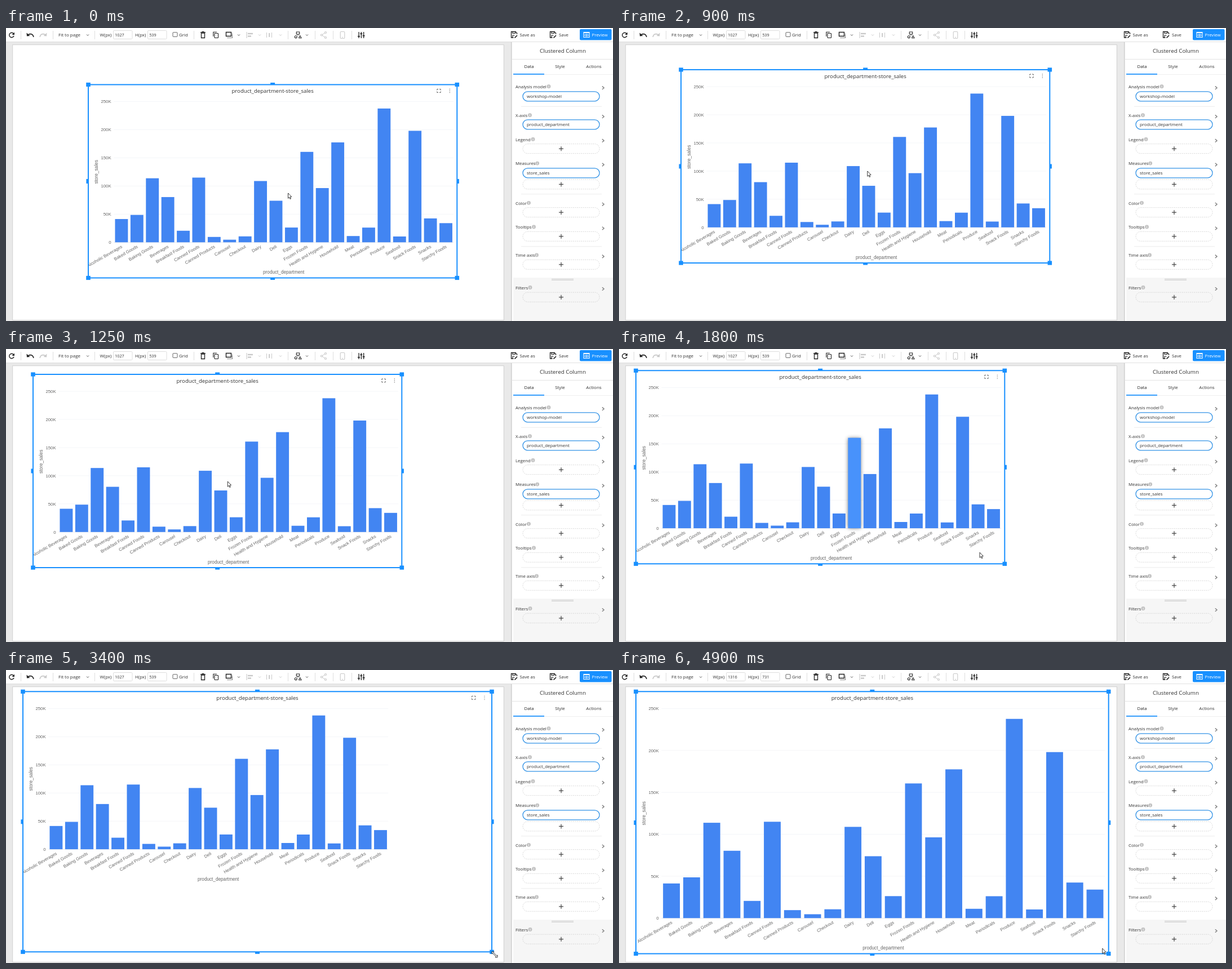
Write an HTML page with a canvas that moves like this. It is 1077x520 px and loops after 5 s.

```html
<!DOCTYPE html>
<html lang="en">
<head>
<meta charset="utf-8">
<title>Resizing a chart</title>
<style>
  html, body { margin: 0; width: 100%; height: 100%; overflow: hidden; background: #e9e9e9; }
  canvas { display: block; width: 1077px; height: 520px; }
</style>
</head>
<body>
<canvas id="stage" width="1077" height="520"></canvas>
<script>
const LOOP = 5000, STEP = 50;
const W = 1077, H = 520;
const BLUE = '#1890ff', INK = '#222', PALE = '#c9c9c9';
const UI = '"Open Sans", "Noto Sans", sans-serif';
const PLOT = '"Liberation Sans", Arial, sans-serif';
const ctx = document.getElementById('stage').getContext('2d');

const data = [
  ['Alcoholic Beverages', 41.3], ['Baked Goods', 48.6], ['Baking Goods', 113.7],
  ['Beverages', 80.3], ['Breakfast Foods', 20.5], ['Canned Foods', 114.9],
  ['Canned Products', 9.5], ['Carousel', 4.6], ['Checkout', 10.5], ['Dairy', 108.8],
  ['Deli', 73.8], ['Eggs', 26.2], ['Frozen Foods', 160.6], ['Health and Hygiene', 96.3],
  ['Household', 177.4], ['Meat', 11.1], ['Periodicals', 26.1], ['Produce', 237.6],
  ['Seafood', 10.3], ['Snack Foods', 198], ['Snacks', 42.4], ['Starchy Foods', 34]
];

// Tracks hold [time, x, y]
const corner = [
  [600, 146, 100.5], [750, 133, 91], [900, 110, 74], [1100, 72, 55],
  [1250, 48, 45], [1400, 34, 39.5], [1500, 30, 38.3]
];
const size = [
  [2750, 654.3, 343], [2850, 657.3, 346.3], [3000, 730, 398], [3200, 800, 446],
  [3400, 832, 462], [3700, 838.7, 465.2]
];
const pointer = [
  [550, 500.5, 293], [650, 495, 290], [750, 476, 277], [900, 440.8, 254],
  [1100, 411, 243], [1250, 393.3, 235], [1400, 386, 231], [1600, 385, 231],
  [1700, 422, 250], [1800, 640, 361], [1850, 640, 361], [1950, 681, 380],
  [2200, 685, 383], [2300, 686, 388], [2400, 685, 383], [2700, 685, 383],
  [2850, 767, 452.5], [3000, 828, 490], [3200, 860, 505], [3350, 867, 505],
  [3800, 867, 504], [3950, 864, 500], [4050, 862.7, 498], [4250, 862.7, 498],
  [4400, 857.7, 494]
];

function sample(track, t) {
  if (t <= track[0][0]) return track[0].slice(1);
  for (let i = 1; i < track.length; i++) {
    const [t1, x1, y1] = track[i], [t0, x0, y0] = track[i - 1];
    if (t <= t1) {
      const k = (t - t0) / (t1 - t0);
      return [x0 + (x1 - x0) * k, y0 + (y1 - y0) * k];
    }
  }
  return track[track.length - 1].slice(1);
}

function text(s, x, y, px, color = '#333', align = 'left', family = UI) {
  ctx.font = px + 'px ' + family;
  ctx.fillStyle = color;
  ctx.textAlign = align;
  ctx.textBaseline = 'alphabetic';
  ctx.fillText(s, x, y + px * 0.35);
}

function box(x, y, w, h, color) {
  ctx.fillStyle = color;
  ctx.fillRect(x, y, w, h);
}

function line(points, color = INK, width = 1) {
  ctx.beginPath();
  for (let i = 0; i < points.length; i += 2) ctx.lineTo(points[i], points[i + 1]);
  ctx.strokeStyle = color;
  ctx.lineWidth = width;
  ctx.stroke();
}

function frame(x, y, w, h, color = INK, width = 1, r = 0) {
  ctx.beginPath();
  ctx.roundRect(x, y, w, h, r);
  ctx.strokeStyle = color;
  ctx.lineWidth = width;
  ctx.stroke();
}

function dot(x, y, r, color) {
  ctx.beginPath();
  ctx.arc(x, y, r, 0, 7);
  ctx.fillStyle = color;
  ctx.fill();
}

function poly(points, fill) {
  ctx.beginPath();
  for (let i = 0; i < points.length; i += 2) ctx.lineTo(points[i], points[i + 1]);
  ctx.closePath();
  ctx.fillStyle = fill;
  ctx.fill();
}

const chevron = (x, y, color = '#555') => line([x - 2, y - 1, x, y + 1, x + 2, y - 1], color, 1);

function curl(x, dir, color) {
  ctx.beginPath();
  ctx.moveTo(x - 4 * dir, 12);
  ctx.quadraticCurveTo(x + 4 * dir, 8, x + 6 * dir, 16);
  ctx.strokeStyle = color;
  ctx.lineWidth = 1.6;
  ctx.stroke();
  poly([x - 6.5 * dir, 8.5, x - 6 * dir, 14.5, x - 0.5 * dir, 14], color);
}

function floppy(x) {
  line([x + 5, 11, x + 5, 9, x + 2.5, 6.5, x - 5, 6.5, x - 5, 17, x - 1, 17], INK, 1.3);
  line([x - 2.5, 6.5, x - 2.5, 9.5, x + 2, 9.5, x + 2, 6.5], INK, 1.1);
  line([x - 2.5, 17, x - 2.5, 13, x + 1, 13], INK, 1.1);
  line([x + 1, 17.5, x + 5.5, 13], INK, 1.7);
}

function toolbar(t) {
  box(0, 0, W, 25, '#fff');
  box(0, 24.3, W, 0.9, '#d4d4d4');
  for (const x of [26, 83, 157, 333, 500, 548, 580, 613]) box(x, 5, 0.8, 15, '#d6d6d6');

  ctx.beginPath();
  ctx.arc(10, 12.5, 4.2, 0.3, 5.5);
  ctx.strokeStyle = INK;
  ctx.lineWidth = 1.4;
  ctx.stroke();
  poly([15, 7.5, 15, 12, 10.5, 12], INK);
  curl(43, 1, INK);
  curl(66, -1, PALE);

  text('Fit to page', 93, 12.5, 8);
  chevron(145, 12.5);
  const grown = t >= 4300;
  const fields = [['W(px)', 166.5, 190, grown ? '1316' : '1027'], ['H(px)', 229, 251, grown ? '731' : '539']];
  for (const [label, x, fx, value] of fields) {
    text(label, x, 12.5, 7.9);
    frame(fx + 0.5, 4.5, 33.5, 15, '#dedede', 1, 1.5);
    text(value, fx + 3.2, 12.5, 7.2);
  }
  frame(296, 7.8, 8, 7.6, '#555', 0.9, 1);
  text('Grid', 307, 12, 7.9);

  frame(346.5, 9, 6, 8.5, INK, 1.3);
  box(345, 7.2, 9, 1.3, INK);
  box(347.5, 6, 4, 1.3, INK);
  frame(370, 9.5, 6.5, 8, INK, 1.1, 0.8);
  line([367.8, 15, 367.8, 7.2, 374, 7.2], INK, 1.1);
  frame(390.5, 7.5, 9, 7, INK, 1.4);
  ctx.setLineDash([1.2, 1.2]);
  line([393, 17.5, 401.5, 17.5, 401.5, 10], INK, 1.2);
  ctx.setLineDash([]);
  chevron(413, 12.5);

  box(426.5, 7, 1.1, 11, PALE);
  box(429, 8.8, 9, 2.4, PALE);
  box(429, 13.4, 6, 2.4, PALE);
  chevron(450, 12.5, PALE);
  box(462, 8, 1, 9, PALE);
  box(466.2, 9, 2, 7, PALE);
  box(471, 8, 1, 9, PALE);
  chevron(487, 12.5, PALE);

  frame(515.3, 7, 5.4, 4, INK, 1.1);
  line([518, 11, 518, 13.5], INK);
  frame(512.3, 13.8, 4, 4, INK, 1.1, 2);
  line([519.3, 17.8, 521.7, 13.6, 524, 17.8, 519.3, 17.8], INK, 1.1);
  chevron(534, 12.5);

  line([567, 8, 560, 12.5, 567, 17], PALE, 1);
  for (const [x, y] of [[567, 8], [560, 12.5], [567, 17]]) {
    dot(x, y, 2.1, PALE);
    dot(x, y, 1, '#fff');
  }
  frame(593.2, 6.5, 7.6, 12, PALE, 1.1, 1.2);
  box(596, 16, 2, 1, PALE);
  for (const [x, y] of [[626, 14], [630.3, 9.5], [634.6, 13]]) {
    box(x - 0.6, 7, 1.3, 11, INK);
    box(x - 2, y, 4, 1.5, INK);
  }

  floppy(901.5);
  text('Save as', 911.5, 12.2, 7.85);
  floppy(970.5);
  text('Save', 981, 12.2, 7.85);
  ctx.beginPath();
  ctx.roundRect(1018, 2, 56.5, 19.5, 2);
  ctx.fillStyle = BLUE;
  ctx.fill();
  frame(1025, 7.5, 10, 9, '#fff', 1.1);
  box(1025, 7, 10, 2, '#fff');
  frame(1027, 11, 6, 3.4, '#fff', 0.9, 1.7);
  dot(1030, 12.7, 0.9, '#fff');
  text('Preview', 1039.5, 12, 7.75, '#fff');
}

const heads = [
  ['Analysis model', 104, 963], ['X-axis', 155, 929.5], ['Legend', 197.7, 935],
  ['Measures', 240.4, 942.7], ['Color', 310.6, 927.5], ['Tooltips', 353.3, 936.5],
  ['Time axis', 403.2, 941.5], ['Filters', 460.8, 930]
];

function sidebar() {
  box(897, 25, W - 897, H - 25, '#fff');
  box(896.3, 25, 1.2, H - 25, '#c6c6c6');
  text('Clustered Column', 988, 40.7, 9.8, '#333', 'center');
  box(898, 55, 179, 0.8, '#dcdcdc');
  text('Data', 928, 68.5, 7.8, '#222', 'center');
  text('Style', 983, 68.5, 7.9, '#333', 'center');
  text('Actions', 1043, 68.5, 8, '#333', 'center');
  box(900, 82.2, 177, 0.7, '#e8e8e8');
  box(900, 81, 55, 1.7, BLUE);
  box(900, 443, 177, 77, '#f6f6f6');
  box(968, 445, 39, 0.8, '#c4c4c4');
  box(968, 447, 39, 0.8, '#c4c4c4');
  for (const y of [138.8, 294.5, 387.5]) box(914, y, 143, 0.7, '#e4e4e4');

  for (const [name, y, ix] of heads) {
    text(name, 904, y + 0.3, 7.85);
    dot(ix, y - 0.3, 3.4, '#c2c2c2');
    box(ix - 0.4, y - 2, 0.9, 0.9, '#fff');
    box(ix - 0.4, y - 0.7, 0.9, 2.4, '#fff');
    line([1057.8, y - 0.6, 1061, y + 2.2, 1057.8, y + 5], '#858585', 1.5);
  }
  for (const [s, y] of [['workshop-model', 121.3], ['product_department', 171.3], ['store_sales', 257.3]]) {
    frame(917, y - 8.5, 136, 17, '#3393e6', 1.3, 8.5);
    text(s, 924, y + 0.3, 7.85);
  }
  for (const y of [214.2, 277.4, 327.2, 369.8, 419.8, 477.7]) {
    ctx.setLineDash([2, 1.5]);
    frame(917, y - 8.5, 136, 17, '#cfcfcf', 0.8, 8.5);
    ctx.setLineDash([]);
    line([981, y, 989, y], '#333', 1.1);
    line([985, y - 4, 985, y + 4], '#333', 1.1);
  }
}

function turned(s, x, y, angle, px, align) {
  ctx.save();
  ctx.translate(x, y);
  ctx.rotate(angle);
  text(s, 0, 0, px, '#666', align, PLOT);
  ctx.restore();
}

function plot(left, top, wide, tall, hot) {
  const x0 = left + 45.2, y0 = top + 30, base = y0 + tall;
  const pitch = wide / data.length, barW = pitch * 0.835;
  for (let v = 0; v <= 250; v += 50) {
    const y = base - tall * v / 250;
    box(x0, y - 0.3, wide, 0.7, v ? '#f0f2f6' : '#dfe2e8');
    text(v ? v + 'K' : '0', left + 40.6, y + 0.2, 7.8, '#666', 'right', PLOT);
  }
  data.forEach(([name, value], i) => {
    const mid = x0 + (i + 0.5) * pitch, h = tall * value / 250;
    if (i === hot) {
      ctx.shadowColor = 'rgba(0,0,0,.55)';
      ctx.shadowBlur = 7;
    }
    box(mid - barW / 2, base - h, barW, h, i === hot ? '#4892fb' : '#4285f2');
    ctx.shadowBlur = 0;
    turned(name, mid + 0.6, base + 6.8, -Math.PI / 6, 7.75, 'right');
  });
  text('product_department', x0 + wide / 2, base + 53.3, 8.2, '#666', 'center', PLOT);
  turned('store_sales', left + 14.5, y0 + tall / 2, -Math.PI / 2, 8.3, 'center');
}

function panel(t) {
  const [x, y] = sample(corner, t), [w, h] = sample(size, t);
  const r = x + w, b = y + h, mx = x + w / 2, my = y + h / 2;
  const relaid = t >= 4350;
  box(x, y, w, h, '#fff');
  ctx.save();
  ctx.beginPath();
  ctx.rect(x, y, w, h);
  ctx.clip();
  plot(x, y, relaid ? 787.2 : 603, relaid ? 372 : 249.8, t >= 1700 && t < 1950 ? 12 : -1);
  ctx.restore();
  text('product_department-store_sales', mx, y + 11.3, 9.6, '#333', 'center');

  if (t < 3900) {
    const ix = r - 32.3, iy = y + 11;
    for (const sx of [-1, 1]) for (const sy of [-1, 1])
      line([ix + sx, iy + 3 * sy, ix + 3.2 * sx, iy + 3 * sy, ix + 3.2 * sx, iy + sy], '#555', 0.9);
    for (const d of [-3, 0, 3]) dot(r - 13, iy + d, 0.65, '#666');
  }

  frame(x, y, w, h, BLUE, 2);
  for (const cx of [x, r]) {
    for (const cy of [y, b]) box(cx - 3.8, cy - 3.6, 7.6, 7.2, BLUE);
    box(cx === x ? cx - 3.6 : cx, my - 4, 3.6, 8, BLUE);
  }
  box(mx - 4, y - 3.5, 8, 3.8, BLUE);
  box(mx - 4, b, 8, 3.5, BLUE);
}

function cursor(t) {
  const [x, y] = sample(pointer, t);
  ctx.save();
  ctx.translate(x, y);
  ctx.lineJoin = 'round';
  if (t >= 1950 && t < 3900) {
    const arrows = [-5, -5, -1, -5, -2.3, -3.7, 3.7, 2.3, 5, 1, 5, 5, 1, 5, 2.3, 3.7, -3.7, -2.3, -5, -1];
    poly(arrows, '#fff');
    line(arrows.concat(-5, -5), '#222', 0.9);
  } else {
    const arrow = [0, 0, 0, 9.3, 2.1, 7.4, 3.6, 10.6, 5, 10, 3.5, 6.9, 6.3, 6.6];
    poly(arrow, '#fff');
    line(arrow.concat(0, 0), '#222', 0.9);
  }
  ctx.restore();
}

function draw(t) {
  box(0, 0, W, H, '#e9e9e9');
  box(11.3, 29.3, 872.5, 489.7, '#cfcfcf');
  box(12.2, 30.2, 870.6, 487.8, '#fff');
  panel(t);
  toolbar(t);
  sidebar();
  cursor(t);
}

function tick(now) {
  draw(Math.floor(now % LOOP / STEP) * STEP);
  requestAnimationFrame(tick);
}
draw(0);
requestAnimationFrame(tick);
</script>
</body>
</html>
```
